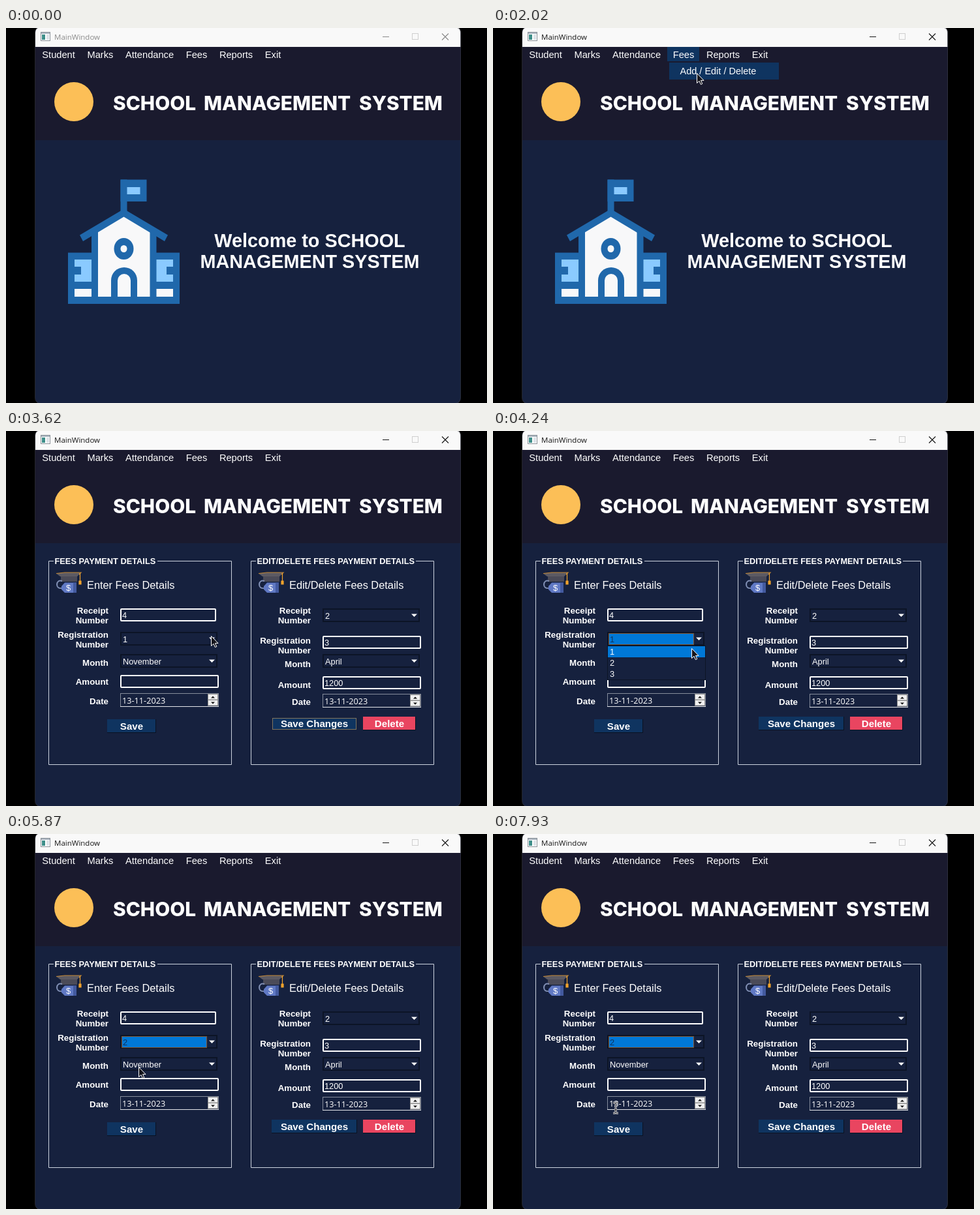
An HTML page that plays this animation: 737x575 px, repeating every 8 s.

```html
<!DOCTYPE html>
<html lang="en">
<head>
<meta charset="utf-8">
<title>School management window</title>
<style>
  html, body { margin: 0; width: 100%; height: 100%; overflow: hidden; background: #000; }
  svg { display: block; width: 737px; height: 575px; }
  text { font-family: "Liberation Sans", Arial, sans-serif; fill: #fff; }
  .ui { font-family: "Open Sans", "Noto Sans", sans-serif; }
  .head { font: 800 29.8px Inter, sans-serif; }
  .bold { font-weight: 700; }
</style>
</head>
<body>
<svg id="stage" viewBox="0 0 737 575"></svg>
<script>
const NAVY = '#16213e', INK = '#1a1a2e', BLUE = '#0f3460', PICK = '#0078d7';
const LOOP = 8000;

const rect = (x, y, w, h, fill, extra = '') =>
  `<rect x="${x}" y="${y}" width="${w}" height="${h}" fill="${fill}" ${extra}/>`;
const path = (d, fill, extra = '') => `<path d="${d}" fill="${fill}" ${extra}/>`;
const oval = (x, y, rx, ry, fill) =>
  `<ellipse cx="${x}" cy="${y}" rx="${rx}" ry="${ry}" fill="${fill}"/>`;
const text = (x, y, size, str, extra = '') =>
  `<text x="${x}" y="${y}" font-size="${size}" ${extra}>${str}</text>`;
const centred = (x, y, size, str) => text(x, y, size, str, 'class="bold" text-anchor="middle"');
const group = (id, body) => `<g id="${id}">${body}</g>`;

// Window frame, title bar, menu bar and banner
function chrome() {
  const menu = ['Student', 'Marks', 'Attendance', 'Fees', 'Reports', 'Exit']
    .map((s, i) => `<tspan dx="${i && 18.6}">${s}</tspan>`).join('');
  const word = (x, s) => `<text class="head" x="${x}" y="125.5">${s}</text>`;
  return rect(45, -1, 651.5, 577, NAVY, 'rx="8"') +
    path('M45 29V7Q45-1 53-1H688.5Q696.5-1 696.5 7V29Z', '#f9f9f9') +
    rect(45, 29, 651.5, 143, INK) +
    rect(44.5, -1, 652, 576.5, 'none', 'rx="8" stroke="#4a4d58" stroke-opacity=".5"') +
    rect(53.5, 6.5, 14, 13, '#fff', 'stroke="#8b9299"') +
    rect(54, 7, 13, 2, '#a9b4bf') + rect(55, 10, 5, 8, '#3f8f8a') + rect(62, 10, 4, 8, '#dde3e8') +
    group('caption', text(74, 18, 11.5, 'MainWindow', 'class="ui" style="fill:currentColor"') +
      path('M577 13.5H587M668 8.5L678 18.5M678 8.5L668 18.5', 'none', 'stroke="currentColor" stroke-width="1.1"')) +
    rect(622.5, 8.5, 9, 9, 'none', 'stroke="#cfcfcf"') +
    group('feesHot', rect(267, 29, 49, 22, BLUE)) +
    text(55.3, 46, 14.67, menu) +
    oval(104, 113, 30, 30, '#fcbf57') +
    word(164, 'SCHOOL') + word(303, 'MANAGEMENT') + word(541, 'SYSTEM');
}

function welcome() {
  const c = '#2068ab', sky = '#8acaff', pale = '#f8f8f9';
  const wing = rect(95, 344.5, 86, 78.5, c) +
    path('M105 355H131V389H105V378H115V366H105Z', sky) + rect(105, 400, 26, 12, pale);
  return rect(175.5, 232.5, 10, 50, c) + rect(175.5, 232.5, 40, 33.5, c) + rect(185.5, 244, 20, 11, sky) +
    wing + `<g transform="translate(361 0) scale(-1 1)">${wing}</g>` +
    path('M131 423V312L180.5 283 230.5 312V423Z', c) +
    path('M141 412V309L180.5 285 220.5 309V412Z', pale) +
    path('M180.5 277.5L248 317.5 243 327 180.5 289.5 118 327 113 317.5Z', c) +
    oval(180.5, 338.5, 15, 16.5, c) + oval(180.5, 338.5, 5, 5.5, pale) +
    path('M161 412V387A20 20 0 0 1 201 387V412Z', c) +
    path('M171 412V387A10 10 0 0 1 191 387V412Z', pale) +
    centred(465.5, 336, 28.8, 'Welcome to SCHOOL') + centred(465.5, 368, 28.8, 'MANAGEMENT SYSTEM');
}

const feeIcon = x => `<g transform="translate(${x} 216)">` +
  path('M8 6H33V15H8Z', '#4b4b58') +
  path('M1 2.5L14 1H39L33 7H7Z', '#5c5a63') +
  path('M1 2.5L14 1H39L36 4', 'none', 'stroke="#c98b35" stroke-width="1.2"') +
  path('M37.5 2V15M36 14H39V19H36Z', '#f2a32c', 'stroke="#f2a32c" stroke-width="1.2"') +
  path('M10 25Q2 26 2 19 3 12 10 14', 'none', 'stroke="#8190b5" stroke-width="2"') +
  path('M9 22L14 16.5H32V32H14L9 27Z', '#6079c4') +
  path('M27 16.5H32V32H27Z', '#435a9f') +
  text(16, 29, 13, '$') + '</g>';

const value = (x, y, s) => text(x, y, 12.8, s);
const lineEdit = (x, y, s, w = 151) =>
  rect(x + 1, y + 1, w - 2, 18, NAVY, 'rx="1" stroke="#fff" stroke-width="2"') + value(x + 3, y + 15, s);
const combo = (x, y, s) =>
  rect(x + 1, y + 1, 147, 19, NAVY, 'stroke="#0c1426" stroke-width="2"') +
  value(x + 4, y + 16, s) + path(`M${x + 136} ${y + 8.5}h9l-4.5 4.5z`, '#fff');
const dateEdit = (x, y) =>
  rect(x + .5, y + .5, 150, 20, NAVY, 'stroke="#858d9c"') +
  path(`M${x} ${y + 20.5}h151`, 'none', 'stroke="#e4e6ea"') +
  text(x + 3, y + 16, 12.7, '13-11-2023', 'class="ui"') +
  [1.5, 10.5].map(d => rect(x + 134.5, y + d, 15, 8.5, '#f0f0f0', 'stroke="#8c8c8c"')).join('') +
  path(`M${x + 139} ${y + 7.5}h6l-3-3zM${x + 139} ${y + 13.5}h6l-3 3z`, '#111');
const button = (x, y, w, fill, s, glow = '') =>
  rect(x, y, w, 21, '#0a1222') + rect(x, y, w - 1, 20, fill) + glow +
  centred(x + w / 2, y + 16, 15.1, s);

// A form label; its words stack on lines 15 px apart
const label = (x, y, s) => s.split(' ').map((word, i) =>
  text(x + 92, y + 15 * i, 13.33, word, 'class="bold" text-anchor="end"')).join('');

// Each row: label, label baseline, widget, widget top, further arguments
const panel = (x, gapEnd, title, heading, rows) =>
  path(`M${x + 8} 199.5H${x + .5}V511.5H${x + 280.5}V199.5H${gapEnd}`, 'none', 'stroke="#ccd3df"') +
  text(x + 9.5, 204, 12.8, title, 'class="bold"') + feeIcon(x + 11) + text(x + 59, 242, 16.35, heading) +
  rows.map(([name, base, widget, y, ...args]) =>
    label(x, base, name) + widget(x + 110, y, ...args)).join('');

const addPanel = () =>
  panel(65, 232, 'FEES PAYMENT DETAILS', 'Enter Fees Details', [
    ['Receipt Number', 279.5, lineEdit, 272, '4', 147],
    ['Registration Number', 317, combo, 308, '1'],
    ['Month', 360, combo, 342, 'November'],
    ['Amount', 389, lineEdit, 374, ''],
    ['Date', 419, dateEdit, 402]
  ]) +
  group('chosen', rect(178, 311, 129, 16, PICK) +
    rect(177.5, 310.5, 130, 17, 'none', 'stroke="#f08a24" stroke-dasharray="1 1"') +
    text(179, 324, 12.8, '<tspan id="chosenText">2</tspan>', `style="fill:${BLUE}"`)) +
  button(155, 442, 75, BLUE, 'Save');

const editPanel = () =>
  panel(375, 628, 'EDIT/DELETE FEES PAYMENT DETAILS', 'Edit/Delete Fees Details', [
    ['Receipt Number', 280, combo, 272, '2'],
    ['Registration Number', 325.5, lineEdit, 314, '3'],
    ['Month', 362, combo, 342, 'April'],
    ['Amount', 394, lineEdit, 376, '1200'],
    ['Date', 420, dateEdit, 403]
  ]) +
  button(407, 438, 131, BLUE, 'Save Changes',
    group('focus', rect(406, 437, 133, 23, NAVY) + rect(408, 440, 129, 18, BLUE) +
      rect(408.5, 440.5, 128, 17, 'none', 'stroke="#f0b45c" stroke-dasharray="1 1"'))) +
  button(547, 438, 81, '#e94560', 'Delete');

const subMenu = () => rect(268, 51, 171, 30, INK) +
  group('subHot', rect(270, 53, 168, 26, BLUE)) + text(286.5, 71, 14.5, 'Add / Edit / Delete');

const dropList = () => rect(175.5, 329.5, 150, 52, NAVY, 'stroke="#0c1426"') +
  group('listHot', rect(176, 330, 149, 17, PICK)) +
  [1, 2, 3].map((n, i) => value(179, 343 + 17 * i, n)).join('');

const BEAM = 'M-4-8H-1.5Q0-8 0-6.5V6.5Q0 8-1.5 8H-4M4-8H1.5Q0-8 0-6.5M4 8H1.5Q0 8 0 6.5M-2 3H2';
const pointer = () =>
  group('arrow', path('M.5.5V15.5L4 12.3 6.4 17.6 8.8 16.5 6.5 11.4H11Z', '#15151c', 'stroke="#fff"')) +
  group('beam', path(BEAM, 'none', 'stroke="#f2f2f2" stroke-width="2.8"') +
    path(BEAM, 'none', 'stroke="#15151c"'));

const stage = document.getElementById('stage');
stage.innerHTML = chrome() + group('welcome', welcome()) +
  group('fees', addPanel() + editPanel()) + group('subMenu', subMenu()) +
  group('dropList', dropList()) + group('cursor', pointer());

// Pointer glides: first step, last step, goal, ease-out power
const glides = [
  { from: 750, to: 1280, x: 303, y: 50, power: 3 },
  { from: 1900, to: 2020, x: 312, y: 69 },
  { from: 2640, to: 3000, x: 292, y: 228 },
  { from: 3120, to: 3360, x: 307, y: 307 },
  { from: 3500, to: 3620, x: 314, y: 314 },
  { from: 4120, to: 4480, x: 294, y: 351 },
  { from: 5140, to: 5390, x: 308, y: 350 },
  { from: 5510, to: 5870, x: 203, y: 357 },
  { from: 6020, to: 6140, x: 243, y: 358 },
  { from: 6290, to: 6650, x: 194, y: 390 },
  { from: 6770, to: 6910, x: 205, y: 428 },
  { from: 7180, to: 7930, x: 188, y: 420, power: 2 }
];

// The screen refreshes about every 125 ms, so a glide advances in whole steps
function pointerAt(t) {
  let x = 699, y = 103;
  for (const g of glides) {
    if (t < g.from) break;
    const steps = Math.round((g.to - g.from) / 125) + 1;
    const done = Math.floor((t - g.from) / (g.to - g.from) * (steps - 1) + 1e-6) + 1;
    const p = 1 - (1 - Math.min(1, done / steps)) ** (g.power || 1);
    x += (g.x - x) * p;
    y += (g.y - y) * p;
  }
  return [x, y].map(Math.round);
}

const el = Object.fromEntries([...stage.querySelectorAll('[id]')].map(n => [n.id, n]));
const show = (id, on) => { el[id].style.display = on ? '' : 'none'; };

function draw(t) {
  const within = (a, b = LOOP) => t >= a && t < b;
  const [x, y] = pointerAt(t);
  const overText = t > 4890 && x < 300 && ((y >= 374 && y < 393) || (y >= 402 && y < 423));
  el.cursor.setAttribute('transform', `translate(${x} ${y})`);
  show('cursor', t >= 750);
  show('arrow', !overText);
  show('beam', overText);
  el.caption.style.color = t < 1280 ? '#8a8a8a' : '#161616';
  show('feesHot', within(1160, 2390));
  show('subMenu', within(1280, 2390));
  el.subMenu.style.opacity = t < 1400 ? .6 : 1;
  show('subHot', t >= 1900);
  show('welcome', t < 2390);
  show('fees', t >= 2390);
  show('focus', t < 3870);
  show('chosen', t >= 3870);
  el.chosenText.textContent = t < 4890 ? '1' : '2';
  show('dropList', within(3870, 4890));
  el.listHot.setAttribute('transform', `translate(0 ${y < 347 ? 0 : 17})`);
}

const start = performance.now();
function tick() {
  draw((performance.now() - start) % LOOP);
  requestAnimationFrame(tick);
}
tick();
</script>
</body>
</html>
```
